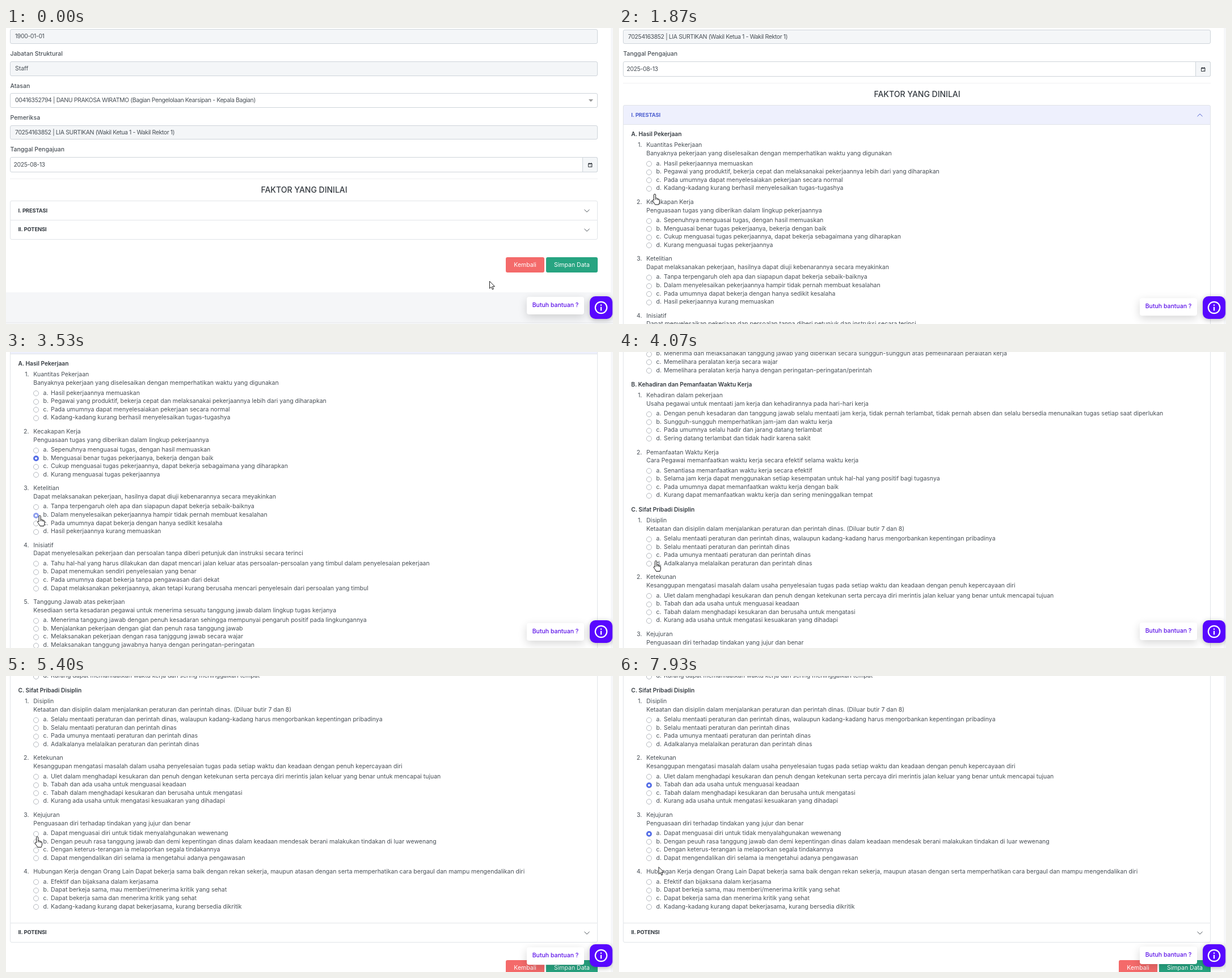
Recreate the animation shown at these times as an HTML page. Size 1070x523 px, loop 8000 ms.

```html
<!DOCTYPE html>
<html lang="id">
<head>
<meta charset="utf-8">
<title>Faktor yang dinilai</title>
<style>
html, body { margin: 0; width: 100%; height: 100%; overflow: hidden; background: #fff; }
#stage { position: absolute; left: 0; top: 0; width: 1070px; height: 523px; overflow: hidden; background: #fff;
  font: 10.5px/16px Inter, "Open Sans", sans-serif; color: #495057; }
#stage div, #stage svg { position: absolute; box-sizing: border-box; }
.text { white-space: pre; height: 16px; }
.label { font-weight: 500; }
.tight { letter-spacing: -.4px; }
.section { font-size: 10.2px; font-weight: 600; color: #343a40; }
.head { font-size: 9.4px; font-weight: 700; letter-spacing: -.1px; color: #343a40; }
.title { font-size: 14px; font-weight: 500; color: #343a40; }
.centre { text-align: center; width: 200px; }
.number { text-align: right; width: 20px; }
.white { color: #fff; }
.box { border: 1px solid #ced4da; border-radius: 3px; background: #fff; }
.grey { background: #f4f6f8; }
.line { background: #e1e4e8; }
.radio { width: 10px; height: 10px; border: 1px solid #b4b8be; border-radius: 50%; background: #fff; }
.radio.on { border: 3px solid #556ee6; }
#gutter { left: 1066px; top: 0; width: 4px; height: 523px; background: #f6f7f9; }
#page, #lower { left: 0; top: 0; width: 1070px; height: 0; }
#panel { left: 0; top: 339px; width: 1066px; overflow: hidden; }
#bubble { left: 918px; top: 474.5px; width: 101px; height: 31px; border-radius: 4px; background: #fff;
  box-shadow: 0 5px 16px rgba(0,0,0,.16); color: #5b10e8; font-size: 10.5px; font-weight: 500;
  line-height: 30px; text-align: center; white-space: pre; }
#help { left: 1029px; top: 474px; width: 40px; height: 40px; border-radius: 10px; background: #5807ff;
  box-shadow: 0 2px 10px rgba(0,0,0,.28); }
svg { overflow: visible; }
</style>
</head>
<body>
<div id="stage">
  <div id="gutter"></div>
  <div id="page"><div id="panel"></div><div id="lower"></div></div>
  <div id="bubble">Butuh bantuan ?</div>
  <div id="help"><svg width="40" height="40" fill="none" stroke="#fff" stroke-width="2.2">
    <circle cx="20" cy="20" r="10.2"/><path d="M20 18.7V25.4M20 14.4V16.8"/></svg></div>
  <svg id="arrow" width="12" height="18"><path d="M.5 .5V13.2L3.5 10.5 5.4 15 7.4 14.1 5.5 9.7H9.5Z" fill="#fff" stroke="#222" stroke-width="1"/></svg>
  <svg id="hand" width="14" height="21"><g stroke="#111" stroke-width="1" stroke-linejoin="round">
    <path fill="#fff" d="M3 11.4V2a1.6 1.6 0 0 1 3.2 0v5.5c1.4-.5 2.4 0 2.7.8 1.2-.3 2 .1 2.2 1 1.2-.1 1.9.5 1.9 1.6v3.6c0 1.5-1 2.5-1.2 4.5H5c-.5-2-2.6-4-4.2-6.6C.2 10.8 1.6 10 3 11.4z"/>
    <path fill="none" d="M6.2 7.5v3M8.9 8.3v2.5M11.1 9.3v2"/></g></svg>
</div>
<script>
const $ = id => document.getElementById(id);
const page = $('page'), panel = $('panel'), lower = $('lower');
const PANEL_TOP = 339, PANEL_H = 1272, LOOP = 8000;

function add(parent, cls, x, y, w, h, bg) {
  const el = document.createElement('div');
  el.className = cls;
  Object.assign(el.style, { left: x + 'px', top: y + 'px' });
  if (w) el.style.width = w + 'px';
  if (h) el.style.height = h + 'px';
  if (bg) el.style.background = bg;
  parent.append(el);
  return el;
}

// y is the middle of the capital letters; whole pixels keep the text sharp
function text(parent, x, y, str, cls = '') {
  const el = add(parent, 'text ' + cls, x, Math.round(y - 8));
  el.textContent = str;
  return el;
}

function centred(parent, x, y, str, cls) {
  text(parent, x - 100, y, str, 'centre ' + cls);
}

function drawing(parent, x, y, d, stroke, fill = 'none') {
  const el = add(parent, '', x, y);
  el.innerHTML = `<svg width="1" height="1"><path d="${d}" stroke="${stroke}" fill="${fill}"/></svg>`;
  return el;
}

// Form fields
function field(y, h, value, cls, x = 16) {
  add(page, 'box ' + cls, 7, y, 1036, h);
  text(page, x, y + h / 2, value, 'tight');
}
field(2, 26, '1900-01-01', 'grey');
field(59, 26, '', 'grey');
text(page, 16, 72, 'Staff');
field(115, 26, '00416352794 | DANU PRAKOSA WIRATMO (Bagian Pengelolaan Kearsipan - Kepala Bagian)', '');
field(172, 25, '70254163852 | LIA SURTIKAN (Wakil Ketua 1 - Wakil Rektor 1)', 'grey');
field(228, 27, '2025-08-13', '', 13.5);
[[46, 'Jabatan Struktural'], [103, 'Atasan'], [158.5, 'Pemeriksa'], [215, 'Tanggal Pengajuan']]
  .forEach(([y, s]) => text(page, 7.5, y, s, 'label'));
drawing(page, 1027, 126, 'M0 0H8L4 4.5Z', 'none', '#999');
add(page, 'box grey', 1016, 228, 27, 27).style.borderRadius = '0 3px 3px 0';
drawing(page, 1025.5, 237.5, 'M.5 1.5H7V7.5H.5ZM.5 2.3H7M2 0V1.5M5.5 0V1.5M4.5 5.5H6', '#343a40');
add(page, '', 7, 266, 1036, 1, '#eff0f2');
centred(page, 525.5, 286, 'FAKTOR YANG DINILAI', 'title');

// Accordion
const head = add(page, 'box', 7, 305, 1036, 35);
head.style.borderColor = '#e1e4e8';
head.style.borderRadius = '3px 3px 0 0';
const headText = text(page, 21.5, 322.5, 'I. PRESTASI', 'head');
const CHEVRON = 'M-4.5 -2.2L0 2.2L4.5 -2.2';
const chevron = drawing(page, 1023.5, 322.5, CHEVRON, '#495057');
const chevronPath = chevron.querySelector('path');
add(panel, 'line', 7, 0, 1, PANEL_H);
add(panel, 'line', 1042, 0, 1, PANEL_H);

const foot = add(lower, 'box', 7, 339, 1036, 35);
foot.style.borderColor = '#e1e4e8';
foot.style.borderRadius = '0 0 3px 3px';
text(lower, 21.5, 356, 'II. POTENSI', 'head');
drawing(lower, 1023.5, 356.5, CHEVRON, '#495057');
add(lower, '', 881, 405, 68, 27, '#f46a6a').style.borderRadius = '3px';
add(lower, '', 952, 405, 91, 27, '#27a481').style.borderRadius = '3px';
centred(lower, 915, 418.5, 'Kembali', 'white');
centred(lower, 997.5, 418.5, 'Simpan Data', 'white');
add(lower, '', 0, 467, 1070, 400, '#f5f6f8');
add(lower, '', 0, 520, 1070, 1, '#e8eaed');

// Each item: title, description, four choices
const sections = [
  ['A. Hasil Pekerjaan', [
    ['Kuantitas Pekerjaan', 'Banyaknya pekerjaan yang diselesaikan dengan memperhatikan waktu yang digunakan',
      'Hasil pekerjaannya memuaskan',
      'Pegawai yang produktif, bekerja cepat dan melaksanakai pekerjaannya lebih dari yang diharapkan',
      'Pada umumnya dapat menyelesaiakan pekerjaan secara normal',
      'Kadang-kadang kurang berhasil menyelesaikan tugas-tugashya'],
    ['Kecakapan Kerja', 'Penguasaan tugas yang diberikan dalam lingkup pekerjaannya',
      'Sepenuhnya menguasai tugas, dengan hasil memuaskan',
      'Menguasai benar tugas pekerjaanya, bekerja dengan baik',
      'Cukup menguasai tugas pekerjaannya, dapat bekerja sebagaimana yang diharapkan',
      'Kurang menguasai tugas pekerjaannya'],
    ['Ketelitian', 'Dapat melaksanakan pekerjaan, hasilnya dapat diuji kebenarannya secara meyakinkan',
      'Tanpa terpengaruh oleh apa dan siapapun dapat bekerja sebaik-baiknya',
      'Dalam menyelesaikan pekerjaannya hampir tidak pernah membuat kesalahan',
      'Pada umumnya dapat bekerja dengan hanya sedikit kesalaha',
      'Hasil pekerjaannya kurang memuaskan'],
    ['Inisiatif', 'Dapat menyelesaikan pekerjaan dan persoalan tanpa diberi petunjuk dan instruksi secara terinci',
      'Tahu hal-hal yang harus dilakukan dan dapat mencari jalan keluar atas persoalan-persoalan yang timbul dalam penyelesaian pekerjaan',
      'Dapat menemukan sendiri penyelesaian yang benar',
      'Pada umumnya dapat bekerja tanpa pengawasan dari dekat',
      'Dapat melaksanakan pekerjaannya, akan tetapi kurang berusaha mencari penyelesain dari persoalan yang timbul'],
    ['Tanggung Jawab atas pekerjaan', 'Kesediaan serta kesadaran pegawai untuk menerima sesuatu tanggung jawab dalam lingkup tugas kerjanya',
      'Menerima tanggung jawab dengan penuh kesadaran sehingga mempunyai pengaruh positif pada lingkungannya',
      'Menjalankan pekerjaan dengan giat dan penuh rasa tanggung jawab',
      'Melaksanakan pekerjaan dengan rasa tanjggung jawab secara wajar',
      'Melaksanakan tanggung jawabnya hanya dengan peringatan-peringatan'],
    ['Pemeliharaan peralatan kerja', 'Kesediaan pegawai untuk memelihara peralatan kerja yang digunakan',
      'Memelihara peralatan kerja dengan penuh kesadaran dan tanggung jawab',
      'Menerima dan melaksanakan tanggung jawab yang diberikan secara sungguh-sungguh atas pemeliharaan peralatan kerja',
      'Memelihara peralatan kerja secara wajar',
      'Memelihara peralatan kerja hanya dengan peringatan-peringatan/perintah']]],
  ['B. Kehadiran dan Pemanfaatan Waktu Kerja', [
    ['Kehadiran dalam pekerjaan', 'Usaha pegawai untuk mentaati jam kerja dan kehadirannya pada hari-hari kerja',
      'Dengan penuh kesadaran dan tanggung jawab selalu mentaati jam kerja, tidak pernah terlambat, tidak pernah absen dan selalu bersedia menunaikan tugas setiap saat diperlukan',
      'Sungguh-sungguh memperhatikan jam-jam dan waktu kerja',
      'Pada umumnya selalu hadir dan jarang datang terlambat',
      'Sering datang terlambat dan tidak hadir karena sakit'],
    ['Pemanfaatan Waktu Kerja', 'Cara Pegawai memanfaatkan waktu kerja secara efektif selama waktu kerja',
      'Senantiasa memanfaatkan waktu kerja secara efektif',
      'Selama jam kerja dapat menggunakan setiap kesempatan untuk hal-hal yang positif bagi tugasnya',
      'Pada umumnya dapat memanfaatkan waktu kerja dengan baik',
      'Kurang dapat memanfaatkan waktu kerja dan sering meninggalkan tempat']]],
  ['C. Sifat Pribadi Disiplin', [
    ['Disiplin', 'Ketaatan dan disiplin dalam menjalankan peraturan dan perintah dinas. (Diluar butir 7 dan 8)',
      'Selalu mentaati peraturan dan perintah dinas, walaupun kadang-kadang harus mengorbankan kepentingan pribadinya',
      'Selalu mentaati peraturan dan perintah dinas',
      'Pada umunya mentaati peraturan dan perintah dinas',
      'Adalkalanya melalaikan peraturan dan perintah dinas'],
    ['Ketekunan', 'Kesanggupan mengatasi masalah dalam usaha penyelesaian tugas pada setiap waktu dan keadaan dengan penuh kepercayaan diri',
      'Ulet dalam menghadapi kesukaran dan penuh dengan ketekunan serta percaya diri merintis jalan keluar yang benar untuk mencapai tujuan',
      'Tabah dan ada usaha untuk menguasai keadaan',
      'Tabah dalam menghadapi kesukaran dan berusaha untuk mengatasi',
      'Kurang ada usaha untuk mengatasi kesuakaran yang dihadapi'],
    ['Kejujuran', 'Penguasaan diri terhadap tindakan yang jujur dan benar',
      'Dapat menguasai diri untuk tidak menyalahgunakan wewenang',
      'Dengan peuuh rasa tanggung jawab dan demi kepentingan dinas dalam keadaan mendesak berani malakukan tindakan di luar wewenang',
      'Dengan keterus-terangan ia melaporkan segala tindakannya',
      'Dapat mengendalikan diri selama ia mengetahui adanya pengawasan'],
    ['Hubungan Kerja dengan Orang Lain Dapat bekerja sama baik dengan rekan sekerja, maupun atasan dengan serta memperhatikan cara bergaul dan mampu mengendalikan diri', '',
      'Efektif dan bijaksana dalam kerjasama',
      'Dapat berkeja sama, mau memberi/menerima kritik yang sehat',
      'Dapat bekerja sama dan menerima kritik yang sehat',
      'Kadang-kadang kurang dapat bekerjasama, kurang bersedia dikritik']]]
];

const radios = {};
let y = 356.4 - PANEL_TOP;
for (const [name, items] of sections) {
  text(panel, 21.5, y, name, 'section');
  y += 20;
  items.forEach(([title, desc, ...choices], i) => {
    text(panel, 20.5, y, i + 1 + '.', 'number');
    text(panel, 48.3, y, title);
    if (desc) text(panel, 48.3, y + 14.7, desc);
    choices.forEach((choice, k) => {
      const cy = y + (desc ? 32.2 : 17.5) + k * 14.55, letter = 'abcd'[k];
      radios[name[0] + (i + 1) + letter] = add(panel, 'radio', 48, Math.round(cy - 4.5));
      text(panel, 65.5, cy, letter + '.');
      text(panel, 79, cy, choice);
    });
    y += 100.45;
  });
}

// Motion tables: [time, value]
const scrollTrack = [[1530, 0], [2100, 266], [2250, 266], [2500, 336], [3600, 336],
  [4050, 922], [4250, 922], [4800, 1175]];
const xTrack = [[0, 852], [850, 80], [1530, 80], [1950, 61], [2450, 61], [2850, 55], [3000, 55],
  [3400, 59.5], [3600, 59.5], [4000, 65], [4600, 65], [5350, 55], [6300, 54], [7700, 69.5]];
const yTrack = [[0, 447], [420, 196], [850, 316], [1530, 316], [1950, 291], [2450, 291], [2850, 188],
  [3000, 188], [3400, 289], [3600, 289], [4000, 369], [4600, 369], [5250, 284], [5400, 284],
  [5550, 279], [5700, 279], [6150, 192], [6300, 192], [7700, 337]];
const clicks = { A2b: 2930, A3b: 3500, C3a: 5600, C2b: 6230 };
const OPEN_AT = 1000;

const clamp = v => Math.min(1, Math.max(0, v));
const smooth = u => u * u * (3 - 2 * u);
function at(track, t) {
  const i = track.findIndex(p => p[0] > t);
  if (i < 0) return track[track.length - 1][1];
  if (i === 0) return track[0][1];
  const [t0, a] = track[i - 1], [t1, b] = track[i];
  return a + (b - a) * smooth((t - t0) / (t1 - t0));
}

function place(el, x, y) { el.style.transform = `translate(${x}px, ${y}px)`; }

function draw(t) {
  const opened = Math.round(PANEL_H * smooth(clamp((t - OPEN_AT) / 350)));
  const active = t >= OPEN_AT;
  place(page, 0, -Math.round(at(scrollTrack, t)));
  panel.style.height = opened + 'px';
  place(lower, 0, opened);
  head.style.background = active ? '#eef0fd' : '#fff';
  headText.style.color = active ? '#4d5fd0' : '';
  chevronPath.setAttribute('stroke', active ? '#4d5fd0' : '#495057');
  chevron.style.transform = `rotate(${-180 * clamp((t - OPEN_AT) / 200)}deg)`;

  for (const key in clicks) {
    const age = t - clicks[key], r = radios[key];
    r.classList.toggle('on', age >= 0);
    r.style.opacity = age >= 0 && age < 100 ? .65 : 1;
  }

  const cx = at(xTrack, t), cy = at(yTrack, t), pointing = t >= 780 && t < 6600;
  $('hand').style.display = pointing ? '' : 'none';
  $('arrow').style.display = pointing ? 'none' : '';
  place($('hand'), cx - 4.5, cy - .5);
  place($('arrow'), cx, cy);
  place($('bubble'), 0, 2.4 * (1 - Math.cos(2 * Math.PI * t / 1500)));
}

const STEP = 1000 / 15, start = performance.now();
function tick() {
  const t = (performance.now() - start) % LOOP;
  draw(Math.floor((t + 4) / STEP) * STEP % LOOP);
  requestAnimationFrame(tick);
}
draw(0);
requestAnimationFrame(tick);
</script>
</body>
</html>
```
